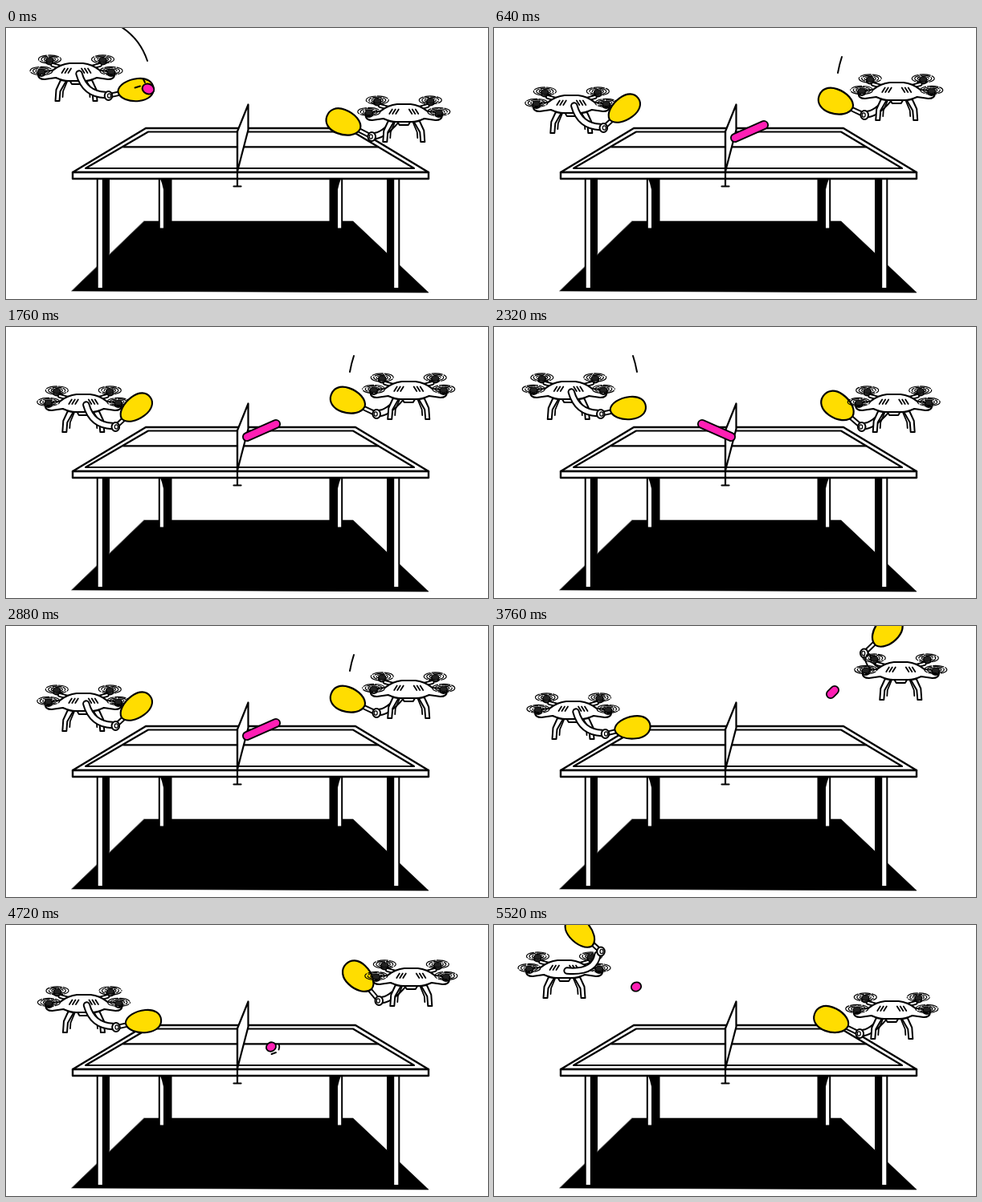
An HTML page with a canvas that plays this animation: 600x338 px, repeating every 5.6 s.

```html
<!DOCTYPE html>
<html lang="en">
<head>
<meta charset="utf-8">
<title>Drone table tennis</title>
<style>
  html, body { margin: 0; height: 100%; overflow: hidden; background: #fff; }
  canvas { display: block; }
</style>
</head>
<body>
<canvas id="stage" width="600" height="338"></canvas>
<script>
const ctx = document.getElementById('stage').getContext('2d');
const STEP = 80, CYCLE = 14, HALF = 7;
const YELLOW = '#ffdd00', PINK = '#ff1fb4';

// Drone pose per step, counted from its own hit.
const drop = [0, 24, 36, 43, 48, 50, 51, 51, 40, 25, 10, 4, 1, 0];
const swing = [
  [12, 12, 12, 12, 13, 13, 15, 30, 43, 48, 54, 95, 134, 137],
  [14, 25, 26, 26, 26, 26, 26, 27, 41, 46, 50, 95, 136, 137]
];
// Ball streak per step of a left-to-right shot.
const flight = [
  [177, 76, 177, 76], [259, 121, 295, 137], [317, 146, 326, 150], [330, 152, 330, 152],
  [365, 124, 385, 107], [419, 85, 424, 80], [429, 77, 429, 77]
];

function shape(d, fill, width) {
  const path = d instanceof Path2D ? d : new Path2D(d);
  if (fill) { ctx.fillStyle = fill; ctx.fill(path); }
  if (width) { ctx.lineWidth = width; ctx.strokeStyle = '#000'; ctx.stroke(path); }
}
function ellipse(x, y, rx, ry, fill, width, angle = 0) {
  const path = new Path2D();
  path.ellipse(x, y, rx, ry, angle, 0, 2 * Math.PI);
  shape(path, fill, width);
}
function tube(d, outer, inner, fill = '#fff') {
  const path = new Path2D(d);
  for (const [w, c] of [[outer, '#000'], [inner, fill]]) {
    ctx.lineWidth = w; ctx.strokeStyle = c; ctx.stroke(path);
  }
}
function mirrored(sum, flip, draw) {
  ctx.save();
  if (flip) { ctx.translate(sum, 0); ctx.scale(-1, 1); }
  draw();
  ctx.restore();
}
function bothSides(sum, draw) {
  mirrored(sum, false, draw);
  mirrored(sum, true, draw);
}

function table() {
  shape('M172 241H432L526 330L82 328Z', '#000', 0.6);
  bothSides(609, () => {
    shape('M190.8 186H197V250.5H190.8Z', '#fff', 2);
    shape('M192 188H206.5V251H197.5V216Q197 200 192 188Z', '#000');
  });
  bothSides(603, () => {
    shape('M121 188H129V280L121 318Z', '#000');
    shape('M113.7 186H120.8V325H113.7Z', '#fff', 2);
  });
  shape('M174 125H435L526 180H83Z', '#fff', 2.4);
  shape('M177 129.5H432L508 175H99Z', '#fff', 2.2);
  shape('M146 148.3H463', null, 2.2);
  shape('M83 180H526V188H83Z', '#fff', 2.4);
  shape('M301.5 95.5V127L288 179V129Z', '#fff', 2.2);
  shape('M288 129V197M283.5 197.5H292.5', null, 2.2);
}

function rotor(x, y, spin) {
  shape(`M${x - 4} ${y}V${y + 5}Q${x} ${y + 8} ${x + 4} ${y + 5}V${y}Z`, '#fff', 1.8);
  ctx.save();
  [14, 10.5, 7].forEach((r, i) => {
    ctx.setLineDash([13 - 2 * i, 2]);
    ctx.lineDashOffset = spin * 7 + i * 5;
    ellipse(x, y, r, r * 0.36, null, 1.2);
  });
  ctx.restore();
  ellipse(x, y + 1, 4.5, 3, '#222', 1);
}

function body(spin) {
  rotor(55.5, 39, spin);
  rotor(121.5, 39, spin + 1);
  bothSides(177, () => {
    shape('M69 65L63.5 77L62.5 91H67.5L68.5 79L76 66Z', '#fff', 2);
    shape('M72 79L71.5 86M77 67L72 79', null, 1.8);
    tube('M59 46L70 49', 5.5, 2);
  });
  shape('M80 65L83 70H94L97 65Z', '#fff', 2);
  shape('M41 58Q41 53 47 54L59 53Q69 45 80 44H97Q108 45 118 53L130 54Q136 53 136 58' +
    'Q136 64 128 64L114 62Q105 66 98 66H79Q72 66 63 62L49 64Q41 64 41 58Z', '#fff', 2.2);
  rotor(45, 53.5, spin + 2);
  rotor(132, 53.5, spin + 3);
  bothSides(177, () =>
    shape('M74 50.5L70.5 56M78 50.5L74.5 56M82 50.5L78.5 56', null, 1.8));
}

function arm(step, side) {
  const [hx, hy] = step === 11 ? [142, 62] : step > 11 ? [134, 33] : [128.5, 84.5];
  const raised = hy < 57;
  const angle = -swing[side][step] * Math.PI / 180;
  const reach = side ? 39 : 34.5;
  const at = r => [hx + r * Math.cos(angle), hy + r * Math.sin(angle)];
  const bend = raised ? [hx - 8, 60] : side ? [112, hy - 2] : [99, hy - 2];
  tube(`M92 57Q${bend} ${hx - 4} ${hy + (raised ? 4 : -1)}`, 9.4, 5.4);
  tube(`M${at(3)}L${at(reach - 20)}`, 6.4, 2.6);
  ellipse(hx, hy, 4.8, 5.6, '#fff', 2);
  ellipse(hx + 1, hy, 2, 2.6, '#fff', 1.2);
  ctx.save();
  ctx.translate(...at(reach));
  ctx.rotate(angle + 0.11);
  if (side) ctx.scale(1, 1.1);
  shape('M-22 0C-21 -8 -9 -14 4 -14C16 -14 22.5 -8 22.5 0C22.5 8 15 14 3 14C-9 14 -21 9 -22 0Z', YELLOW, 2.1);
  ctx.restore();
}

function drone(step, side) {
  mirrored(594, side, () => {
    ctx.translate(drop[step] * 0.22 - 1, drop[step]);
    if (side) { arm(step, side); body(step); }
    else { body(step); arm(step, side); }
  });
}

function shot(step, side) {
  const hit = step === 0, arrival = step === HALF - 1;
  // The right player meets the ball a little farther out.
  mirrored(hit || arrival ? 606 : 595, side, () => {
    const [x1, y1, x2, y2] = flight[step];
    if (hit) ellipse(x1, y1, 7.5, 6.2, PINK, 2, 0.4);
    else if (x1 === x2) ellipse(x1, y1, 6.3, 5.5, PINK, 1.8, step === 3 ? -0.6 : 0.4);
    else tube(`M${x1} ${y1}L${x2} ${y2}`, 12, 8.4, PINK);
    if (step === 3) shape('M339.8 149Q341 152 339.5 155.5M330.5 161L336 159', null, 1.9);
    if (hit) shape('M160.5 74.5L167 72.5M171 64L173 68', null, 1.9);
  });
  mirrored(606, side, () => {
    if (hit) shape('M144 -1Q167 14 176 41', null, 2);
    if (step === 1) shape('M173 36Q176 45 178 56', null, 2);
  });
}

function frame(now) {
  const step = Math.floor(now / STEP) % CYCLE;
  ctx.fillStyle = '#fff';
  ctx.fillRect(0, 0, 600, 338);
  table();
  drone(step, 0);
  drone((step + HALF) % CYCLE, 1);
  shot(step % HALF, step < HALF ? 0 : 1);
}

ctx.lineCap = ctx.lineJoin = 'round';
const start = performance.now();
(function tick() {
  frame(performance.now() - start);
  requestAnimationFrame(tick);
})();
</script>
</body>
</html>
```
